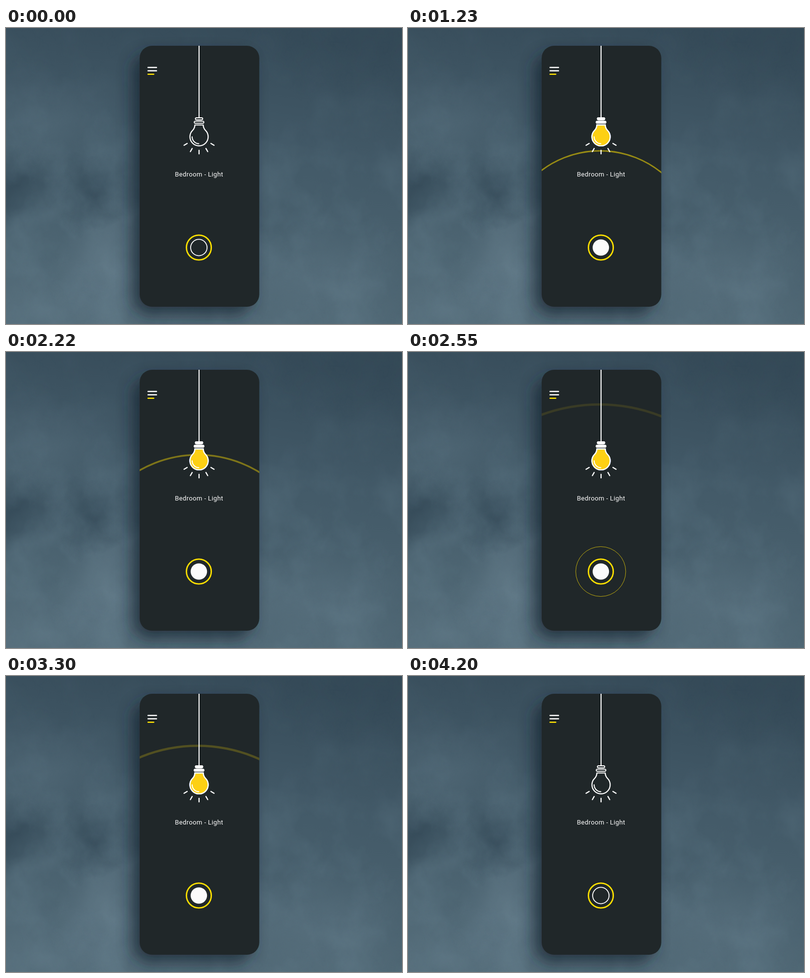
An HTML page for the animation above (4.95 s loop, 800 px wide and 600 px high).

```html
<!DOCTYPE html>
<html lang="en">
<head>
<meta charset="utf-8">
<title>Bedroom light</title>
<style>
  html, body { margin: 0; width: 100%; height: 100%; overflow: hidden; background: #455b69; }
  svg { display: block; width: 800px; height: 600px; }
  .line { fill: none; stroke: #fff; stroke-linecap: round; stroke-linejoin: round; }
  text { font: 13px Roboto, sans-serif; letter-spacing: .4px; fill: #fff; }
</style>
</head>
<body>
<svg viewBox="0 0 800 600">
  <defs>
    <linearGradient id="sky" x1=".6" y1="0" x2=".4" y2="1">
      <stop offset="0" stop-color="#364b59"/>
      <stop offset=".4" stop-color="#435a68"/>
      <stop offset="1" stop-color="#516976"/>
    </linearGradient>
    <radialGradient id="light">
      <stop offset="0" stop-color="#647c8a"/>
      <stop offset="1" stop-color="#647c8a" stop-opacity="0"/>
    </radialGradient>
    <radialGradient id="dark">
      <stop offset="0" stop-color="#324755"/>
      <stop offset="1" stop-color="#324755" stop-opacity="0"/>
    </radialGradient>
    <linearGradient id="fade" x1=".7" y1="0" x2=".5" y2="1">
      <stop offset=".1" stop-color="#222"/>
      <stop offset=".6" stop-color="#ccc"/>
    </linearGradient>
    <mask id="low"><rect width="800" height="600" fill="url(#fade)"/></mask>
    <filter id="warp" filterUnits="userSpaceOnUse" x="-80" y="-80" width="960" height="760" color-interpolation-filters="sRGB">
      <feTurbulence type="fractalNoise" baseFrequency=".012" numOctaves="5" seed="8"/>
      <feDisplacementMap in="SourceGraphic" scale="75" xChannelSelector="R" yChannelSelector="G"/>
    </filter>
    <filter id="haze" filterUnits="userSpaceOnUse" x="0" y="0" width="800" height="600" color-interpolation-filters="sRGB">
      <feTurbulence type="fractalNoise" baseFrequency=".012 .01" numOctaves="5" seed="21"/>
      <feColorMatrix values="0 0 0 0 .46  0 0 0 0 .57  0 0 0 0 .63  .6 0 0 0 -.24"/>
    </filter>
    <filter id="shade" filterUnits="userSpaceOnUse" x="150" y="0" width="480" height="600">
      <feGaussianBlur stdDeviation="16"/>
    </filter>
    <clipPath id="screen"><rect x="270" y="36" width="241.7" height="529" rx="25"/></clipPath>
    <path id="glass" d="M381.6 196.5H398.4Q398.6 203 403 207.5A18.4 18.4 0 1 1 377 207.5Q381.4 203 381.6 196.5Z"/>
    <g id="cap">
      <rect x="382.6" y="182" width="14.8" height="4.2" rx="2.1"/>
      <rect x="380.3" y="188.9" width="19.4" height="4.2" rx="2.1"/>
    </g>
  </defs>

  <rect width="800" height="600" fill="url(#sky)"/>
  <g filter="url(#warp)">
    <g fill="url(#light)">
      <ellipse cx="205" cy="470" rx="110" ry="150" opacity=".75"/>
      <ellipse cx="90" cy="570" rx="230" ry="110" opacity=".4"/>
      <ellipse cx="80" cy="190" rx="190" ry="120" opacity=".3"/>
      <ellipse cx="620" cy="520" rx="230" ry="140" opacity=".4"/>
    </g>
    <g fill="url(#dark)">
      <ellipse cx="10" cy="330" rx="110" ry="90" opacity=".8"/>
      <ellipse cx="180" cy="335" rx="90" ry="80" opacity=".75"/>
      <ellipse cx="760" cy="20" rx="280" ry="130" opacity=".5"/>
    </g>
  </g>
  <rect width="800" height="600" filter="url(#haze)" mask="url(#low)"/>

  <rect x="257" y="54" width="238" height="525" rx="28" fill="#16232d" opacity=".75" filter="url(#shade)"/>
  <rect x="270" y="36" width="241.7" height="529" rx="25" fill="#202729"/>

  <g id="rings" clip-path="url(#screen)" fill="none" stroke="#fadc05"></g>

  <g class="line" stroke-width="2.6">
    <path d="M287 80H304M287 86.8H304"/>
    <path d="M287 93.7H298.4" style="stroke:#fde000"/>
  </g>
  <path d="M390 36V182" stroke="#fff" stroke-width="2"/>

  <use href="#cap" class="line" stroke-width="1.9"/>
  <use href="#glass" class="line" stroke-width="2.2"/>
  <circle id="idle" cx="389.6" cy="445" r="16.6" class="line" stroke-width="1.8"/>
  <g id="glow">
    <use href="#cap" fill="#fff" stroke="#fff" stroke-width="1.9"/>
    <use href="#glass" fill="#fdd014" stroke="#fff" stroke-width="2.4"/>
    <circle cx="389.6" cy="445" r="16.6" fill="#fbfbfb"/>
  </g>
  <path class="line" stroke-width="2" d="M376 220.5A14 14 0 0 0 389.5 234.5"/>
  <g id="rays" class="line" stroke-width="2.3"></g>

  <text x="341.2" y="300.8">Bedroom - Light</text>
  <circle cx="389.6" cy="445" r="25.1" fill="none" stroke="#fde000" stroke-width="2.8"/>
</svg>

<script>
const LOOP = 4950, STEP = 30;
const FADE = 240, ON = 630, OFF = 3690;
const FIRST = 660, GAP = 870, LIFE = 1130, PULSES = 3;

const $ = id => document.getElementById(id);
const clamp = v => Math.max(0, Math.min(1, v));
const add = (parent, tag, attrs) => {
  const el = document.createElementNS('http://www.w3.org/2000/svg', tag);
  set(el, attrs);
  return parent.appendChild(el);
};
const set = (el, attrs) => {
  for (const key in attrs) el.setAttribute(key, attrs[key]);
};

for (let angle = -60; angle <= 60; angle += 30) {
  add($('rays'), 'path', { d: 'M390 247.9V255.2', transform: `rotate(${angle} 390 220.2)` });
}
const rings = Array.from({ length: PULSES }, () => add($('rings'), 'circle', { cy: 445 }));

function drawRing(ring, age) {
  const alive = age > 0 && age < LIFE;
  ring.style.display = alive ? '' : 'none';
  if (!alive) return;
  // Steady growth, a little slower at both ends.
  const r = age * (.344 - 5e-8 * (age - 530) ** 2);
  set(ring, {
    r,
    cx: 389.8 - .009 * r,
    'stroke-width': .0147 * r,
    opacity: clamp((LIFE - age) / 1020)
  });
}

function draw(ms) {
  const t = Math.floor(ms % LOOP / STEP) * STEP;
  const lit = Math.min(clamp((t - ON) / FADE), clamp(1 - (t - OFF) / FADE));
  set($('glow'), { opacity: lit });
  set($('idle'), { opacity: 1 - lit });
  rings.forEach((ring, i) => drawRing(ring, t - FIRST - i * GAP));
}

const start = performance.now();
function tick() {
  draw(performance.now() - start);
  requestAnimationFrame(tick);
}
tick();
</script>
</body>
</html>
```
